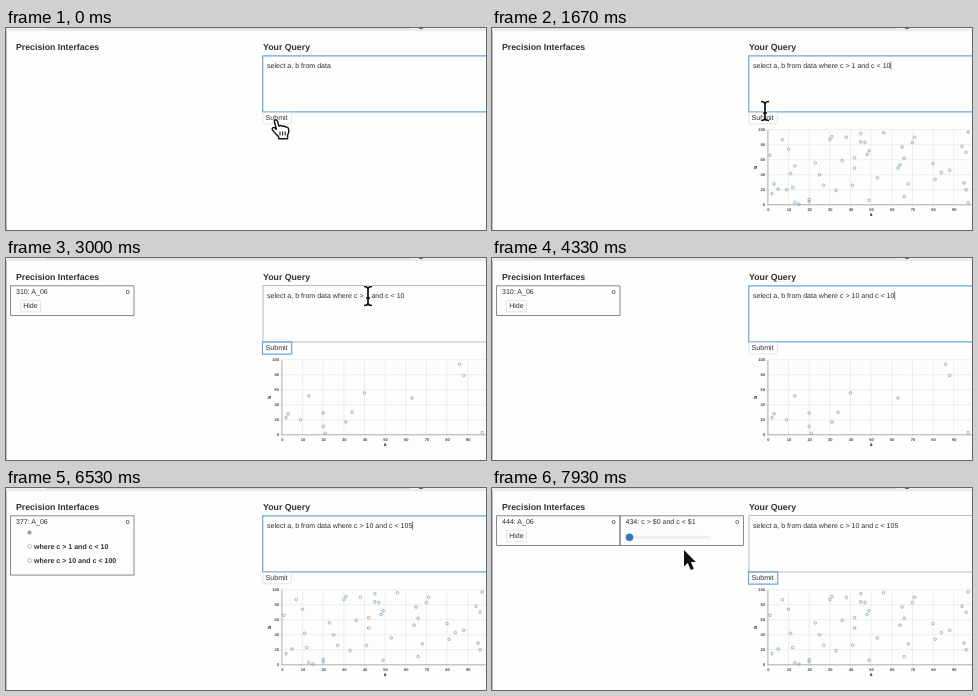
Recreate the animation shown at these times as an HTML page with a canvas. Size 480 by 202 pixels, loop 8 s.

```html
<!DOCTYPE html>
<html lang="en">
<head>
<meta charset="utf-8">
<title>Precision Interfaces</title>
<style>
  html, body { margin: 0; width: 100%; height: 100%; overflow: hidden; background: #fdfdfd; }
  canvas { display: block; }
</style>
</head>
<body>
<canvas id="stage" width="480" height="202"></canvas>
<script>
const ctx = document.getElementById('stage').getContext('2d');
const LOOP = 8000;
const INK = '#303030', FOCUS_BLUE = '#66a8e0';

// Seeded data set: the first rows satisfy 1 < c < 10, the others 10 < c < 100.
let seed = 2024;
const random = () => (seed = seed * 16807 % 2147483647) / 2147483647;
const ROWS = Array.from({ length: 60 }, () => ({ a: Math.round(random() * 98), b: Math.round(random() * 97) }));
const LOW = ROWS.slice(0, 14), HIGH = ROWS.slice(14), MIXED = ROWS.slice(9);

// Clicks alternate between the Submit button and the query field.
const CLICKS = [270, 670, 2070, 3270, 4930, 5870, 7070];
const REPLY_DELAY = 130;
const RESULTS = [
  {},
  { rows: MIXED },
  { rows: LOW, panel: () => hidePanel(310) },
  { rows: HIGH, panel: () => radioPanel(377) },
  { rows: HIGH, panel: () => sliderPanel(444) }
];
const EDITS = [
  { time: 0, low: 1, high: 10 },
  { time: 3530, low: 10, high: 10 },
  { time: 4400, low: 10, high: 100 },
  { time: 6330, low: 10, high: 10 },
  { time: 6530, low: 10, high: 105 }
];

// Places where the pointer rests; it glides from one to the next.
const BUTTON = { x: 269, y: 92 };
const STOPS = [
  { ...BUTTON, from: 0, until: 330 },
  { x: 335, y: 42, from: 600, until: 1530 },
  { x: 273, y: 83, from: 1670, until: 1700 },
  { ...BUTTON, from: 1800, until: 2350 },
  { x: 362, y: 38, from: 2900, until: 3700 },
  { x: 407, y: 36, from: 3930, until: 4600 },
  { ...BUTTON, from: 4870, until: 5400 },
  { x: 345, y: 67, from: 5470, until: 5530 },
  { x: 420, y: 42, from: 5800, until: 6730 },
  { ...BUTTON, from: 7070, until: 7660 },
  { x: 192, y: 62, from: 7930, until: LOOP }
];
// The pointer is hidden while keys are pressed.
const TYPING = [[730, 1530], [3470, 3700], [4330, 4600], [6270, 6730]];

const clicksBefore = t => CLICKS.filter(c => c <= t).length;
const ease = p => p * p * (3 - 2 * p);

function pointerAt(t) {
  const i = STOPS.findLastIndex(s => s.from <= t);
  const here = STOPS[i], next = STOPS[i + 1];
  if (!next || t <= here.until) return here;
  const p = ease((t - here.until) / (next.from - here.until));
  return { x: here.x + (next.x - here.x) * p, y: here.y + (next.y - here.y) * p };
}

function text(str, x, y, { size = 7.05, bold = false, align = 'left', color = INK } = {}) {
  ctx.font = `${bold ? 'bold ' : ''}${size}px "Liberation Sans", Arial, sans-serif`;
  ctx.textRendering = 'geometricPrecision';
  ctx.textAlign = align;
  ctx.fillStyle = color;
  ctx.fillText(str, x, y);
}

function box(x, y, w, h, color, lineWidth = 1, radius = 0) {
  ctx.beginPath();
  ctx.roundRect(x, y, w, h, radius);
  ctx.strokeStyle = color;
  ctx.lineWidth = lineWidth;
  ctx.stroke();
}

function line(x1, y1, x2, y2, color, lineWidth = 1) {
  ctx.beginPath();
  ctx.moveTo(x1, y1);
  ctx.lineTo(x2, y2);
  ctx.strokeStyle = color;
  ctx.lineWidth = lineWidth;
  ctx.stroke();
}

function circle(x, y, r, fill, stroke, lineWidth = 0.7) {
  ctx.beginPath();
  ctx.arc(x, y, r, 0, 2 * Math.PI);
  if (fill) { ctx.fillStyle = fill; ctx.fill(); }
  if (stroke) { ctx.strokeStyle = stroke; ctx.lineWidth = lineWidth; ctx.stroke(); }
}

function drawPage() {
  ctx.fillStyle = '#fdfdfd';
  ctx.fillRect(0, 0, 480, 202);
  ctx.fillStyle = '#f1f1f1';
  ctx.fillRect(0, 0, 480, 2);
  line(0, 2.3, 480, 2.3, '#dedede', 0.8);
  line(40, 0.3, 404, 0.3, '#c4c4c4', 0.7);
  ctx.fillStyle = '#666';
  ctx.fillRect(413, 0, 4, 1);
  line(0.5, 3, 0.5, 202, '#c0c0c0');
  const heading = { size: 8.75, bold: true };
  text('Precision Interfaces', 10, 22.4, heading);
  text('Your Query', 257, 22.4, heading);
}

function panelFrame(x, height, title) {
  box(x, 27.8, 123.5, height, '#7c7c7c', 0.9);
  text(title, x + 5.5, 36);
  text('o', x + 115.3, 36);
}

function hidePanel(id) {
  panelFrame(4.5, 29.7, `${id}: A_06`);
  box(14.5, 42.3, 20, 11.5, '#dcdcdc', 0.8, 1);
  text('Hide', 17.2, 50.3);
}

function radioPanel(id) {
  panelFrame(4.5, 59.3, `${id}: A_06`);
  const choices = ['', 'where c > 1 and c < 10', 'where c > 10 and c < 100'];
  choices.forEach((label, i) => {
    const y = 44.5 + i * 14;
    circle(23.5, y, 1.9, '#fff', '#999');
    text(label, 28, y + 2.2, { bold: true });
  });
  circle(23.5, 44.5, 1, '#444');
}

function sliderPanel(id) {
  hidePanel(id);
  panelFrame(128, 29.7, '434: c > $0 and c < $1');
  ctx.fillStyle = '#eeeeee';
  ctx.fillRect(134, 47.7, 83, 3);
  circle(137.5, 49.3, 3.8, '#337ab7');
}

function drawQuery(t) {
  const { low, high } = EDITS.findLast(e => e.time <= t);
  const clause = ` where c > ${low} and c < ${high}`;
  // Typing runs at one key per 26 ms, with a short pause after the first half.
  const typingTime = Math.min(t, 1000) + Math.max(t - 1270, 0) - 730;
  const query = 'select a, b from data' + clause.slice(0, Math.max(0, Math.floor(typingTime / 26)));
  const submitFocused = clicksBefore(t) % 2 === 1;

  if (submitFocused) box(257, 27.5, 240, 56.5, '#b4b4b4', 0.9);
  else box(256.7, 27.8, 240, 56, FOCUS_BLUE, 1.2);
  text(query, 261, 39.6);
  if (!submitFocused && clicksBefore(t) > 0) {
    const before = t >= 3270 && t < 4000 ? query.slice(0, query.indexOf(' and')) : query;
    const x = 261.3 + ctx.measureText(before).width;
    line(x, 33.5, x, 41.5, '#333', 0.7);
  }

  if (submitFocused) box(256.5, 83.9, 29.2, 12.2, FOCUS_BLUE, 1.2);
  else box(256.8, 84.2, 28.5, 11.6, '#dedede', 0.8, 1);
  text('Submit', 259.6, 92.2);
}

function drawChart(rows) {
  const left = 275.9, top = 101.8, bottom = 176.8, stepX = 20.65, stepY = 15;
  const tick = { size: 4, bold: true, color: '#444' };
  const title = { size: 4.8, bold: true, align: 'center', color: '#111' };
  for (let i = 0; i <= 10; i++) {
    const x = left + i * stepX;
    line(x, top, x, bottom + 2, '#e2e2e2', 0.6);
    text(i * 10, x + 0.4, 182.5, { ...tick, align: 'center' });
  }
  for (let i = 0; i <= 5; i++) {
    const y = bottom - i * stepY;
    line(left - 2, y, 480, y, '#e0e0e0', 0.6);
    text(i * 20, 273, y + 1.5, { ...tick, align: 'right' });
  }
  line(left, top, left, bottom, '#999', 0.7);
  line(left, bottom, 480, bottom, '#999', 0.7);
  text('a', 379, 187.6, title);
  ctx.save();
  ctx.translate(265, 139.3);
  ctx.rotate(-Math.PI / 2);
  text('b', 0, 0, title);
  ctx.restore();
  for (const { a, b } of rows) {
    circle(left + a / 10 * stepX, bottom - b / 20 * stepY, 1.3, null, '#7599b6');
  }
}

const ARROW = new Path2D('M0 0V16.5L3.8 13L6.8 20L9.8 18.7L6.9 12H11.8Z');
const BEAM = new Path2D('M-4 -9.5Q0 -9.5 0 -6.5Q0 -9.5 4 -9.5M0 -7V7M-4 9.5Q0 9.5 0 6.5Q0 9.5 4 9.5M-2 2H2');
const HAND = new Path2D('M-.8 .8Q.6 -1.2 2.3 .8L4 6.2Q6 4.8 7.3 6.4Q9.2 5.4 10.4 7.2Q13 6.4 13.6 9' +
  'Q14.4 12.5 12.6 15.5V18.8H3.6V16.6Q.5 14 -2.8 9.6Q-3 7 -.6 7.6L1.4 9.2Z');
const KNUCKLES = new Path2D('M5 11.5V15.5M7.6 11.5V15.5M10.2 11.5V15.5');

function drawPointer(t) {
  if (TYPING.some(([from, until]) => t >= from && t < until)) return;
  const { x, y } = pointerAt(t);
  const stroke = (shape, color, width) => {
    ctx.strokeStyle = color;
    ctx.lineWidth = width;
    ctx.stroke(shape);
  };
  const overField = x > 257 && y > 27 && y < 84;
  const overButton = x > 257 && x < 285 && y >= 84 && y < 97;
  ctx.save();
  ctx.translate(x, y);
  ctx.lineJoin = 'round';
  if (overField) {
    stroke(BEAM, '#fff', 3);
    stroke(BEAM, '#111', 1.7);
  } else if (overButton) {
    stroke(HAND, '#fff', 3);
    ctx.fillStyle = '#fff';
    ctx.fill(HAND);
    stroke(HAND, '#111', 1.4);
    stroke(KNUCKLES, '#111', 1);
  } else {
    stroke(ARROW, '#fff', 2.2);
    ctx.fillStyle = '#111';
    ctx.fill(ARROW);
  }
  ctx.restore();
}

const start = performance.now();
function frame() {
  const t = (performance.now() - start) % LOOP;
  // Every odd click is a submission, answered after a short delay.
  const { rows, panel } = RESULTS[Math.ceil(clicksBefore(t - REPLY_DELAY) / 2)];
  drawPage();
  if (panel) panel();
  drawQuery(t);
  if (rows) drawChart(rows);
  drawPointer(t);
  requestAnimationFrame(frame);
}
frame();
</script>
</body>
</html>
```
